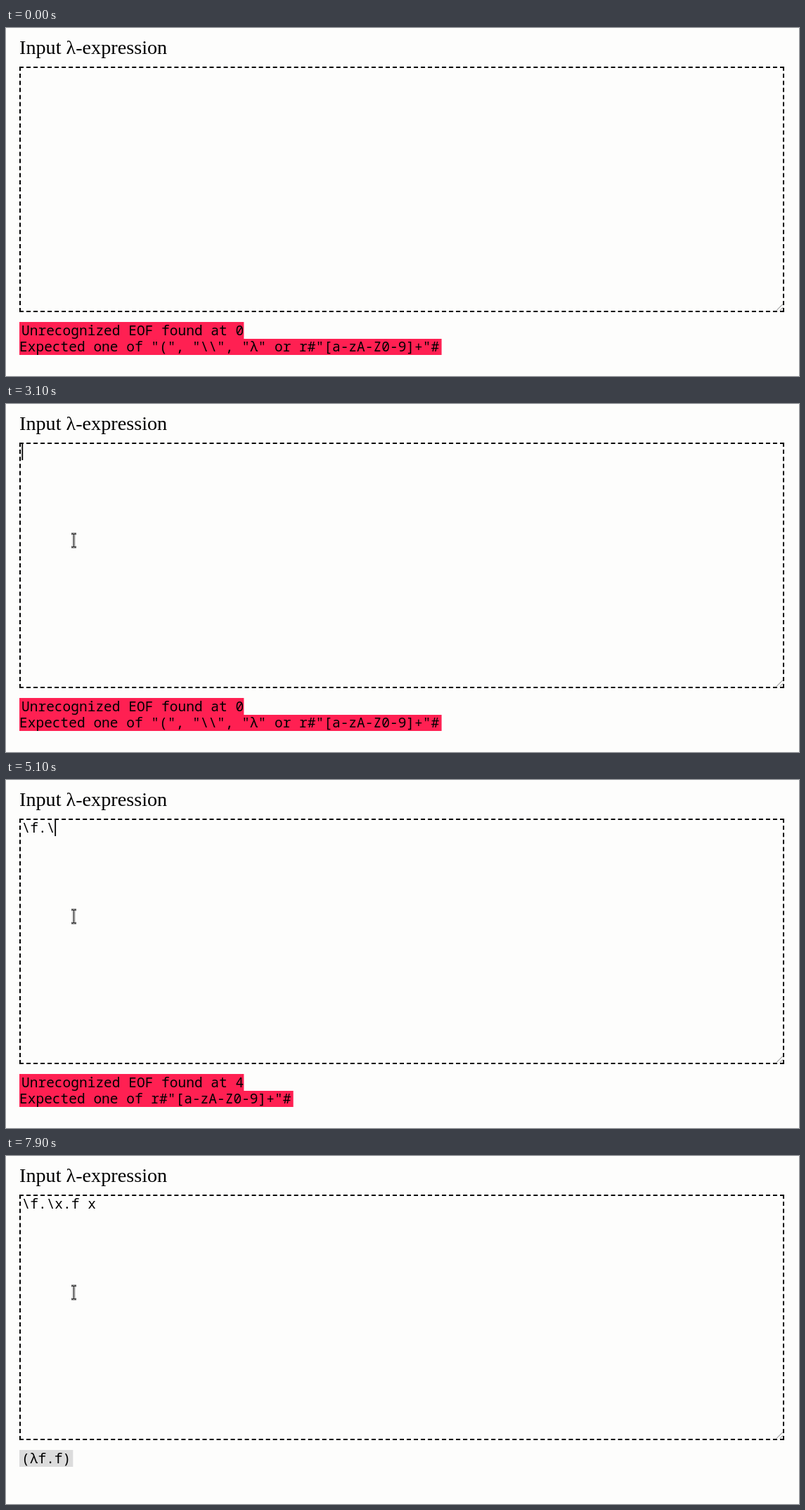
An HTML page that plays this animation: 1128 px wide and 496 px high, repeating every 8 s.

```html
<!DOCTYPE html>
<html lang="en">
<head>
<meta charset="utf-8">
<title>Lambda input</title>
<style>
  html, body { margin: 0; width: 100%; height: 100%; overflow: hidden; background: #fdfdfc; }
  #stage { position: relative; width: 1128px; height: 496px; overflow: hidden; }
  #area { position: absolute; left: 19px; top: 55px; width: 1088px; height: 350px;
          box-sizing: border-box; border: 2px dashed #000; }
  svg { position: absolute; left: 0; top: 0; }
  text { white-space: pre; fill: #000; }
  .title { font: 28.2px "Liberation Serif", serif; }
  .mono { font: 19.53px "Noto Sans Mono", monospace; font-variant-ligatures: none; }
</style>
</head>
<body>
<div id="stage">
  <div id="area"></div>
  <svg width="1128" height="496" viewBox="0 0 1128 496">
    <text class="title" x="19" y="37">Input λ-expression</text>
    <path d="M1096 402.5L1105 393.5M1101 402.5L1105 398.5" stroke="#777" fill="none"/>
    <rect id="back1" x="19" y="419" height="24"/>
    <rect id="back2" x="19" y="443" height="23" fill="#ff2052"/>
    <text id="line1" class="mono" x="22" y="438"></text>
    <text id="line2" class="mono" x="19" y="461"></text>
    <text id="typed" class="mono" x="22.5" y="75"></text>
    <rect id="caret" y="57" width="1.8" height="23"/>
    <g id="arrow">
      <path d="M0 0V19L4.5 15L7.5 22L11 20.5L8 14H13.5Z" fill="#111" stroke="#fff" stroke-width="2.4"
            paint-order="stroke" style="filter:drop-shadow(0 1px 1px #0006)"/>
    </g>
    <g id="beam" fill="none">
      <path id="beamShape" d="M-3.5 -9.5H-1L0 -8.5L1 -9.5H3.5M0 -8.5V8.5M-3.5 9.5H-1L0 8.5L1 9.5H3.5" stroke="#999" stroke-width="3.6"/>
      <use href="#beamShape" style="stroke-width:2"/>
      <path d="M-3.5 -9.5H-1L0 -8.5L1 -9.5H3.5M0 -8.5V8.5M-3.5 9.5H-1L0 8.5L1 9.5H3.5" stroke="#fff" stroke-width="2.6"/>
      <path d="M-3.5 -9.5H-1L0 -8.5L1 -9.5H3.5M0 -8.5V8.5M-3.5 9.5H-1L0 8.5L1 9.5H3.5" stroke="#222" stroke-width="1.3"/>
    </g>
  </svg>
</div>
<script>
const LOOP = 8000, STEP = 100, PITCH = 11.718;
const ID = 'r#"[a-zA-Z0-9]+"#';
const TERM = '"(", "\\\\", "λ" or ' + ID;
const DOT = '"."';
const SOURCE = '\\f.\\x.f x';

// [time, value] tables; each value holds until the next entry
const typing = [[0, 0], [3800, 1], [4100, 2], [4600, 3], [5000, 4], [5400, 5],
                [5700, 6], [6700, 7], [7000, 8], [7400, 9]];
const caretOn = [[0, 0], [600, 1], [1100, 0], [3100, 1], [3600, 0], [3800, 1],
                 [6000, 0], [6500, 1], [7900, 0]];
const results = [
  [0, { at: 0, want: TERM }], [3900, { at: 1, want: ID }], [4200, { at: 2, want: DOT }],
  [4700, { at: 3, want: TERM }], [5100, { at: 4, want: ID }], [5500, { at: 5, want: DOT }],
  [5700, { at: 6, want: TERM }], [6800, { value: '(λf.(λx.f))' }], [7500, { value: '(λf.f)' }]
];
const pointer = [[100, 1090, 465], [400, 640, 330], [700, 130, 225], [900, 10, 204],
                 [1500, 10, 204], [1700, 96.5, 194.5]];

const el = id => document.getElementById(id);
const held = (table, t) => table.findLast(([start]) => start <= t)[1];
const show = (node, on) => node.setAttribute('visibility', on ? 'visible' : 'hidden');

function pointerAt(t) {
  const i = pointer.findIndex(([time]) => time > t);
  if (i < 0) return pointer.at(-1).slice(1);
  if (i === 0) return null;
  const [t0, x0, y0] = pointer[i - 1], [t1, x1, y1] = pointer[i];
  const k = (t - t0) / (t1 - t0);
  return [x0 + (x1 - x0) * k, y0 + (y1 - y0) * k];
}

function drawResult({ at, want, value }) {
  const failed = !value;
  const first = value || `Unrecognized EOF found at ${at}`;
  const second = failed ? `Expected one of ${want}` : '';
  el('line1').textContent = first;
  el('line2').textContent = second;
  el('back1').setAttribute('fill', failed ? '#ff2052' : '#dcdcdc');
  el('back1').setAttribute('width', first.length * PITCH + (failed ? 3 : 6));
  el('back2').setAttribute('width', second.length * PITCH + 3);
  show(el('back2'), failed);
}

function drawPointer(t) {
  const spot = pointerAt(t);
  const [x, y] = spot || [0, 0];
  const inside = x > 19 && x < 1107 && y > 55 && y < 405;
  for (const id of ['arrow', 'beam']) {
    el(id).setAttribute('transform', `translate(${x} ${y})`);
    show(el(id), spot && inside === (id === 'beam'));
  }
}

function draw(now) {
  const t = Math.floor(now % LOOP / STEP) * STEP;
  const count = held(typing, t);
  el('typed').textContent = SOURCE.slice(0, count);
  el('caret').setAttribute('x', 22.4 + count * PITCH);
  show(el('caret'), held(caretOn, t));
  drawResult(held(results, t));
  drawPointer(t);
}

const begin = performance.now();
function tick() {
  draw(performance.now() - begin);
  requestAnimationFrame(tick);
}
tick();
</script>
</body>
</html>
```
